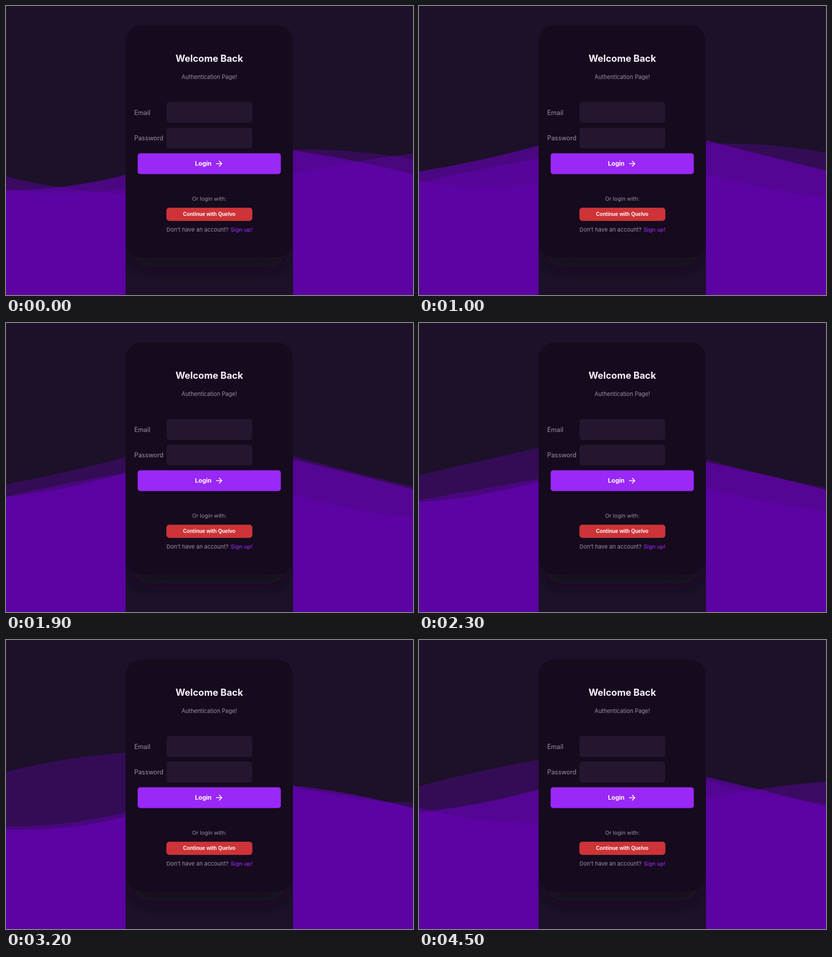
Recreate the animation shown at these times as an HTML page. Size 800 by 570 pixels, loop 4600 ms.

```html
<!DOCTYPE html>
<html lang="en">
<head>
<meta charset="utf-8">
<title>Login</title>
<style>
  html, body { margin: 0; width: 100%; height: 100%; overflow: hidden; background: #1c1128; }
  svg { display: block; width: 800px; height: 570px; font-family: Inter, "Open Sans", sans-serif; }
  .wave { fill: #6a00bc; }
  .muted { fill: #9a91a3; }
  .mid { text-anchor: middle; }
  .input { fill: #24162e; }
</style>
</head>
<body>
<svg viewBox="0 0 800 570">
  <defs>
    <filter id="blur" x="-30%" y="-60%" width="160%" height="220%">
      <feGaussianBlur stdDeviation="16"/>
    </filter>
    <clipPath id="column"><rect x="235" y="38" width="329" height="532"/></clipPath>
  </defs>
  <rect width="800" height="570" fill="#1c1128"/>
  <g id="waves"></g>

  <g clip-path="url(#column)">
    <rect x="235" y="38" width="329" height="532" fill="#1c1128"/>
    <rect x="251" y="410" width="297" height="104" rx="30" fill="#160b1d" filter="url(#blur)"/>
    <rect x="235" y="38" width="329" height="458" rx="32" fill="#160a1e"/>
  </g>

  <text class="mid" x="399.5" y="110" font-size="18.4" font-weight="700" fill="#f8f2fb">Welcome Back</text>
  <text class="mid muted" x="399.5" y="144.3" font-size="11.1">Authentication Page!</text>

  <text class="muted" x="252" y="215" font-size="12.6">Email</text>
  <rect class="input" x="315.5" y="189.5" width="168.5" height="41" rx="5"/>
  <text class="muted" x="252" y="265" font-size="12.4">Password</text>
  <rect class="input" x="315.5" y="240" width="168.5" height="41" rx="5"/>

  <rect x="258.8" y="290.5" width="281.4" height="41" rx="5" fill="#9a28f7"/>
  <text x="371.5" y="315.3" font-size="12" font-weight="700" fill="#fff">Login</text>
  <path d="M413 311H424M418.8 305.6L424.2 311L418.8 316.4" fill="none" stroke="#fff" stroke-width="1.6"/>

  <text class="mid muted" x="399.5" y="383.8" font-size="10.8">Or login with:</text>
  <rect x="315.8" y="398.3" width="168" height="25" rx="5" fill="#cd3337" stroke="#d8433d" stroke-width=".8"/>
  <text class="mid" x="399.5" y="414.3" font-size="10" font-weight="700" fill="#fff"
    font-family="'Liberation Sans', Arial, sans-serif">Continue with Quelvo</text>
  <text class="muted" x="315.5" y="444.5" font-size="11">Don’t have an account?</text>
  <text x="441.5" y="444.5" font-size="11" font-weight="500" fill="#9328e8">Sign up!</text>
</svg>
<script>
const LOOP = 4600, STEP = 100;

// Turning points of the swell; a pose is the height at x = 0, 235, 565 and 800.
const times = [0, 1100, 1900, 3400, 4500];
const waves = [
  { opacity: 0.3, poses: [[361, 358, 283, 303], [342, 345, 271, 290], [318, 265, 262, 322],
    [256, 220, 291, 319], [288, 236, 276, 322]] },
  { opacity: 0.4, poses: [[336, 370, 330, 291], [348, 296, 332, 383], [343, 296, 338, 383],
    [368, 346, 289, 323], [331, 362, 312, 279]] },
  { opacity: 0.6, poses: [[364, 333, 285, 332], [325, 273, 264, 324], [343, 296, 269, 328],
    [375, 350, 288, 332], [340, 295, 270, 328]] },
];

const group = document.getElementById("waves");
for (const wave of waves) {
  wave.path = document.createElementNS("http://www.w3.org/2000/svg", "path");
  wave.path.setAttribute("class", "wave");
  wave.path.setAttribute("fill-opacity", wave.opacity);
  group.append(wave.path);
}

// Smooth pass through the turning points (cubic Hermite).
function poseAt(poses, t) {
  const last = times.length - 1;
  let i = 0;
  while (i < last - 1 && t >= times[i + 1]) i++;
  const span = times[i + 1] - times[i], u = (t - times[i]) / span, v = 1 - u;
  return poses[i].map((from, p) => {
    const slope = k => {
      const a = Math.max(k - 1, 0), b = Math.min(k + 1, last);
      return (poses[b][p] - poses[a][p]) / (times[b] - times[a]);
    };
    return v * v * (1 + 2 * u) * from + u * u * (3 - 2 * u) * poses[i + 1][p]
      + span * u * v * (v * slope(i) - u * slope(i + 1));
  });
}

// Each side sags or swells with the tilt of the hidden middle.
const bend = (outer, inner, farInner) => (outer + inner) / 2 + 2 * ((inner - farInner) / 9 + 2);

function wavePath([a, b, c, d]) {
  return `M0 ${a}Q117.5 ${bend(a, b, c)} 235 ${b}L565 ${c}Q682.5 ${bend(d, c, b)} 800 ${d}V570H0Z`;
}

function draw(t) {
  for (const { path, poses } of waves) path.setAttribute("d", wavePath(poseAt(poses, t)));
}

const start = performance.now();
function tick() {
  const t = (performance.now() - start) % LOOP;
  draw(Math.floor(t / STEP) * STEP);
  requestAnimationFrame(tick);
}
tick();
</script>
</body>
</html>
```
